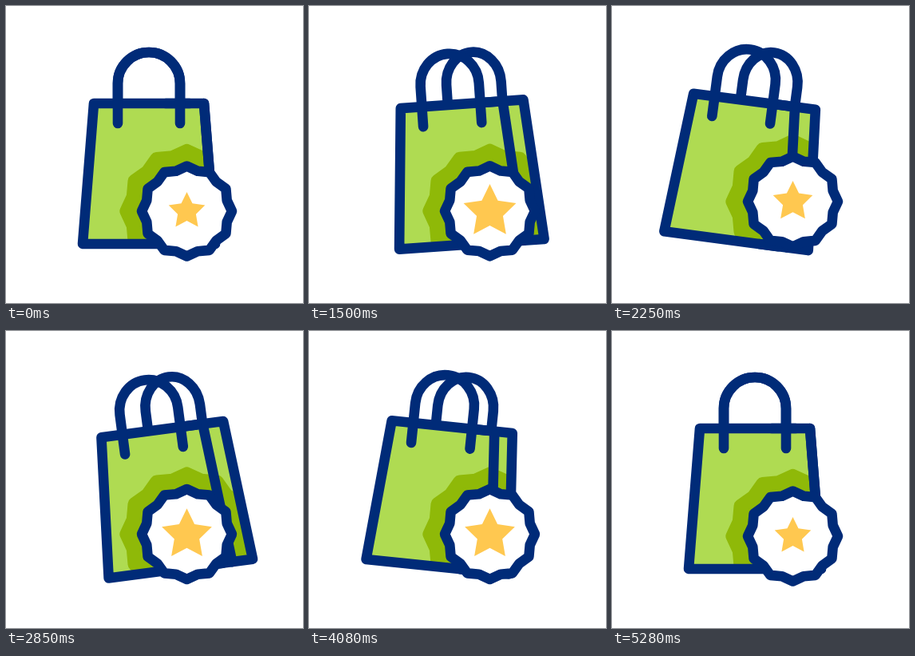
Write an HTML page without scripts that moves like this. It is 372 by 372 pixels and loops after 5400 ms.

```html
<!DOCTYPE html>
<html lang="en">
<head>
<meta charset="utf-8">
<title>Shopping bag with star seal</title>
<style>
  @property --tilt { syntax: "<angle>"; inherits: true; initial-value: 0deg; }
  @property --open { syntax: "<number>"; inherits: true; initial-value: 0; }
  @property --bob { syntax: "<length>"; inherits: true; initial-value: 0px; }
  @property --pulse { syntax: "<number>"; inherits: true; initial-value: 1; }

  html, body { margin: 0; width: 100%; height: 100%; overflow: hidden; background: #fff; }

  svg {
    --navy: #002b78;
    --light: #afdb52;
    --dark: #8fb908;
    display: block;
    width: 100%;
    height: 100%;
    animation: tilt 5.4s infinite, open 5.4s infinite, bob 5.4s infinite, pulse 5.4s infinite;
  }

  .line { fill: none; stroke: var(--navy); stroke-width: 12.6; stroke-linecap: round; stroke-linejoin: round; }
  .face { fill: var(--light); }

  .bag { transform-origin: 200px 56px; transform: rotate(var(--tilt)); }
  .upright { transform-origin: 200px 56px; transform: rotate(calc(-1 * var(--tilt))); }

  /* Opening the bag slides the side panel out and the front edge in. */
  .side { transform: translateX(calc(16px * var(--open))); }
  .edge { transform: translateX(calc(-10px * var(--open))); }

  .handle { transform-origin: 179px 97px; vector-effect: non-scaling-stroke; }
  .front { transform: translateX(calc(-5.7px * var(--open))) scaleX(calc(1 - .06 * var(--open))); }
  .back { transform: translateX(calc(24.5px * var(--open))) scaleX(calc(1 - .12 * var(--open))); }

  .seal { transform: translate(226.5px, calc(257px + var(--bob))); }
  .halo { transform: scale(1.34); fill: var(--dark); stroke: var(--dark); }
  .disc { fill: #fff; stroke: var(--navy); }
  .halo, .disc { stroke-width: 12.6; stroke-linejoin: round; }
  .star { fill: #ffc850; transform-origin: 0 -2.2px; transform: scale(var(--pulse)); }

  @keyframes tilt {
    0%, 5.556% { --tilt: 0deg; animation-timing-function: cubic-bezier(.6, 0, .667, .82); }
    22.222%, 55.556% { --tilt: -10deg; animation-timing-function: cubic-bezier(.333, .18, .667, .82); }
    38.889%, 72.222% { --tilt: 10deg; animation-timing-function: cubic-bezier(.333, .18, .667, .82); }
    85.556% { --tilt: -9.5deg; animation-timing-function: cubic-bezier(.333, .18, .5, 1); }
    97.778%, 100% { --tilt: 0deg; }
  }
  @keyframes open {
    0%, 5.556% { --open: 0; animation-timing-function: ease-in-out; }
    22.222%, 72.222% { --open: 1; animation-timing-function: ease-in-out; }
    85.556%, 100% { --open: 0; }
  }
  @keyframes bob {
    0%, 26.944%, 49.722%, 72.5%, 95.278%, 100% { --bob: 0px; animation-timing-function: cubic-bezier(.37, 0, .63, 1); }
    38.333%, 61.111%, 83.889% { --bob: -15px; animation-timing-function: cubic-bezier(.37, 0, .63, 1); }
  }
  @keyframes pulse {
    0%, 15.556%, 38.333%, 61.111%, 83.889%, 100% { --pulse: 1; animation-timing-function: cubic-bezier(.37, 0, .63, 1); }
    26.944%, 49.722%, 72.5% { --pulse: 1.45; animation-timing-function: cubic-bezier(.37, 0, .63, 1); }
  }
</style>
</head>
<body>
<svg viewBox="0 0 372 372">
  <defs>
    <path id="scallop" d="M56.5 0L50.2 13.5L48.9 28.2L36.8 36.8L28.2 48.9L13.5 50.2L0 56.5
      L-13.5 50.2L-28.2 48.9L-36.8 36.8L-48.9 28.2L-50.2 13.5L-56.5 0
      L-50.2 -13.5L-48.9 -28.2L-36.8 -36.8L-28.2 -48.9L-13.5 -50.2L0 -56.5
      L13.5 -50.2L28.2 -48.9L36.8 -36.8L48.9 -28.2L50.2 -13.5Z"/>
    <clipPath id="bagArea">
      <path d="M110 122H248L262 298H96Z"/>
      <path class="side" d="M110 122H248L262 298H96Z"/>
    </clipPath>
  </defs>

  <g class="bag">
    <path class="line handle back" d="M140 122V97a39 39 0 0 1 78 0V122"/>
    <path class="face side" d="M110 122H248L262 298H96Z"/>
    <path class="face" d="M110 122H248L262 298H96Z"/>
    <g clip-path="url(#bagArea)">
      <g class="upright">
        <g class="seal"><use class="halo" href="#scallop"/></g>
      </g>
    </g>
    <path class="line side" d="M200 122H248L262 298H200"/>
    <path class="line edge" d="M248 122L262 298"/>
    <path class="line" d="M230 122H110L96 298H240"/>
    <path class="line handle front" d="M140 147V97a39 39 0 0 1 78 0V147"/>
  </g>

  <g class="seal">
    <use class="disc" href="#scallop"/>
    <path class="star" d="M0 -24L7 -9.7L22.8 -7.4L11.4 3.7L14.1 19.4L0 12L-14.1 19.4L-11.4 3.7L-22.8 -7.4L-7 -9.7Z"/>
  </g>
</svg>
</body>
</html>
```
